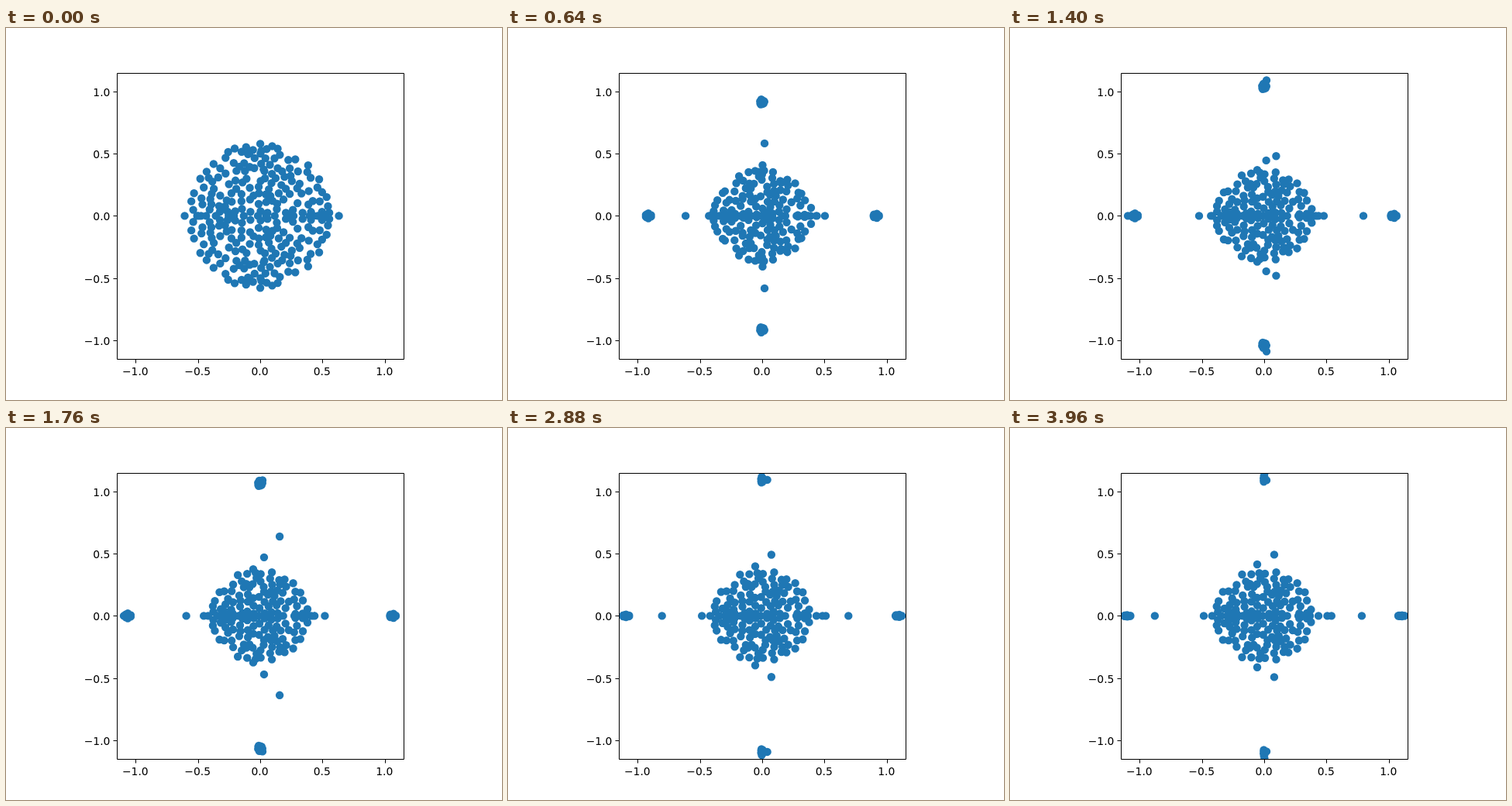
These frames come from a looping animation (640x480 px, 4.05 s). An HTML page:

```html
<!DOCTYPE html>
<html lang="en">
<head>
<meta charset="utf-8">
<title>Eigenvalue scatter</title>
<style>
html, body { margin: 0; width: 100%; height: 100%; overflow: hidden; background: #fff; }
svg { display: block; width: 100%; height: 100%; }
text { font: 13.89px "DejaVu Sans", sans-serif; }
</style>
</head>
<body>
<svg viewBox="0 0 640 480">
  <clipPath id="area"><rect x="143" y="58" width="371" height="370"/></clipPath>
  <path id="dots" clip-path="url(#area)" fill="none" stroke="#1f77b4" stroke-width="10.4" stroke-linecap="round"/>
  <path id="axes" fill="none" stroke="#000"/>
  <g id="labels"></g>
</svg>
<script>
const CX = 328, CY = 242.4, UNIT = 160.7;
const LOOP = 4050, STEP = 40, LAST = 3960;
const DISC = 94, SHRINK = 0.69;
const STAYERS = 70, LEAVERS = 48, REALS = 16;

let seed = 20;
function random() {
  seed = (seed + 0x6D2B79F5) | 0;
  let v = Math.imul(seed ^ seed >>> 15, 1 | seed);
  v = v + Math.imul(v ^ v >>> 7, 61 | v) ^ v;
  return ((v ^ v >>> 14) >>> 0) / 4294967296;
}
const spread = size => (random() * 2 - 1) * size;
const mix = (a, b, k) => a + (b - a) * k;
const clamp = k => Math.min(1, Math.max(0, k));
const smooth = k => k * k * (3 - 2 * k);
const sigmoid = (t, mid, width) => 1 / (1 + Math.exp((mid - t) / width));
const many = (n, make) => Array.from({ length: n }, (_, i) => make(i));

// Upper half of the opening disc: each spot is the roomiest of a few tries.
const taken = [];
function openSpot() {
  let best, bestGap = -1;
  for (let i = 0; i < 8; i++) {
    const a = random() * Math.PI, r = DISC * Math.sqrt(random());
    const x = r * Math.cos(a) * 0.97, y = Math.max(4, r * Math.sin(a));
    const gap = Math.min(...taken.map(p => Math.hypot(p.x - x, p.y - y)), DISC);
    if (gap > bestGap) { best = { x, y }; bestGap = gap; }
  }
  taken.push(best);
  return best;
}

const stayers = many(STAYERS, () => ({ ...openSpot(), dx: spread(6), dy: spread(6) }));
const leavers = many(LEAVERS, () => {
  const { x, y } = openSpot();
  const a = random() * 2 * Math.PI, r = Math.sqrt(random());
  return {
    x, y, up: y > Math.abs(x), side: Math.sign(x),
    radial: r * Math.cos(a), across: r * Math.sin(a),
    delay: random() * 140, span: 260 + random() * 140
  };
});
const reals = many(REALS, i => mix(-66, 68, i / (REALS - 1)) + spread(3));

// Late movers on the real axis: from, to, middle time, width.
const LATE = [
  [-60, -144, 1950, 600], [-60, -176, 710, 100], [-64, -78, 1600, 300],
  [66, 130, 2350, 600], [80, 176, 1400, 150], [60, 88, 2100, 600], [58, 82, 2100, 500]
];

function place(t) {
  const out = [];
  const real = x => out.push([x, 0]);
  const pair = (x, y) => out.push([x, y], [x, -y]);
  const ease = (from, to, mid, width) => mix(from, to, sigmoid(t, mid, width));
  const settle = 1 - Math.exp(-t / 150);
  const scale = mix(1, SHRINK, settle);
  const widen = scale / SHRINK;
  const drift = settle * Math.exp(-t / 900);

  for (const p of stayers) {
    pair(p.x * scale + p.dx * drift, Math.abs(p.y * scale * mix(1, 0.94, settle) + p.dy * drift));
  }
  for (const x of reals) real(x * widen);

  const ring = 177 - 30 * Math.exp((640 - t) / 700);
  const long = mix(4, 4.8, clamp(t / 3000));
  const wide = mix(3.2, 0.9, clamp((t - 1800) / 1600));
  for (const p of leavers) {
    const k = smooth(clamp((t - p.delay) / p.span));
    const r = ring + p.radial * long, s = p.across * wide;
    pair(mix(p.x, p.up ? s : p.side * r, k), mix(p.y, p.up ? r : s, k));
  }

  for (const move of LATE) real(ease(...move) * mix(1, widen, 0.6));

  // Four stragglers above the bulk; the first two join the top cluster.
  const bow = sigmoid(t, 1950, 350);
  pair(108 * bow * (1 - bow), mix(55, 184, bow) * widen);
  pair(3 * widen, ease(60, 175, 720, 90));
  pair(ease(0, 13, 1950, 400), ease(64, 79, 1400, 300) * widen);
  pair(-9 * widen, ease(56, 68, 2300, 900) * widen);
  return out;
}

function drawAxes() {
  const snap = v => Math.round(v) + 0.5;
  let d = "M143.5 58.5H513.5V427.5H143.5Z", labels = "";
  for (const v of [-1, -0.5, 0, 0.5, 1]) {
    const x = CX + v * UNIT, y = CY - v * UNIT;
    const name = v.toFixed(1).replace("-", "\u2212");
    d += `M${snap(x)} 428v4.5M143 ${snap(y)}h-4.5`;
    labels += `<text x="${x - 0.5}" y="448" text-anchor="middle">${name}</text>` +
      `<text x="134.4" y="${Math.round(y + 6)}" text-anchor="end">${name}</text>`;
  }
  document.getElementById("axes").setAttribute("d", d);
  document.getElementById("labels").innerHTML = labels;
}

const dots = document.getElementById("dots");
function render(time) {
  const t = Math.min(LAST, Math.floor(time % LOOP / STEP) * STEP);
  dots.setAttribute("d", place(t)
    .map(([x, y]) => `M${(CX + x).toFixed(2)} ${(CY - y).toFixed(2)}h.01`).join(""));
}

drawAxes();
const start = performance.now();
function tick() {
  render(performance.now() - start);
  requestAnimationFrame(tick);
}
tick();
</script>
</body>
</html>
```
